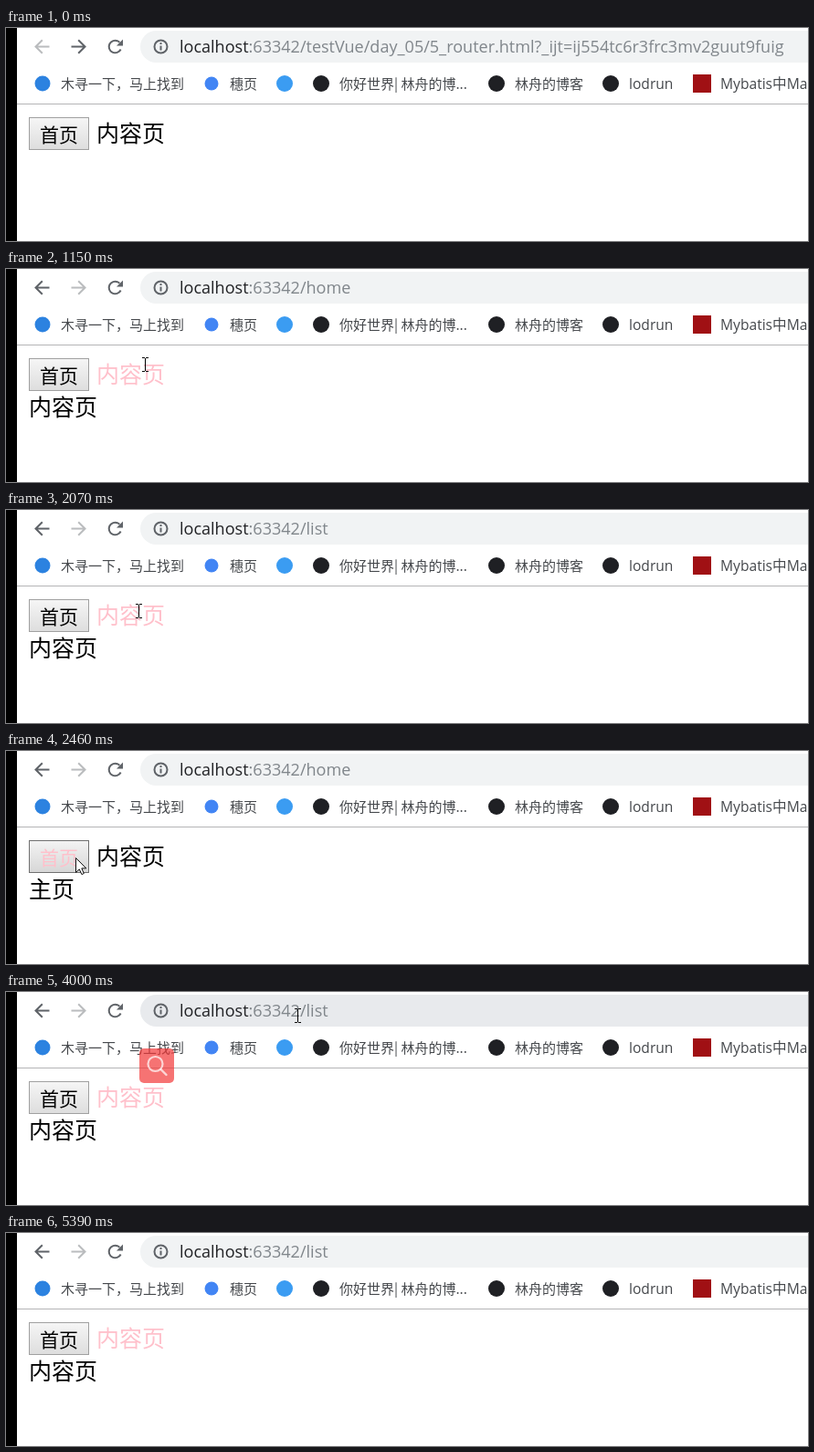
An HTML page with a canvas for the animation above (5490 ms loop, 878 by 234 pixels).

```html
<!DOCTYPE html>
<html lang="zh">
<head>
<meta charset="utf-8">
<title>Router demo</title>
<style>
html, body { margin: 0; width: 100%; height: 100%; overflow: hidden; background: #fff; }
canvas { display: block; }
</style>
</head>
<body>
<canvas id="stage" width="878" height="234"></canvas>
<script>
const ctx = document.getElementById('stage').getContext('2d');
const LOOP = 5490, STEP = 76.7;
const CJK = '"Noto Sans CJK SC", "Noto Sans CJK", "Noto Sans CJK JP", sans-serif';
const LATIN = '"Open Sans", "Noto Sans CJK SC", "Noto Sans CJK", sans-serif';
const PINK = '#ffc0cb', INK = '#5f6368', FADED = '#babcbe';

const urls = {
  start: '/testVue/day_05/5_router.html?_ijt=ij554tc6r3frc3mv2guut9fuig',
  home: '/home',
  list: '/list'
};
const pages = { start: '', home: '主页', list: '内容页' };

// Step at which each page opens; the address follows one step later
const visits = [[0, 'start'], [10, 'home'], [15, 'list'], [20, 'home'], [26, 'list'], [30, 'home'], [36, 'list']];

// Pointer: step, x, y
const path = [
  [1, 697, 214], [3, 480, 130], [5, 250, 62], [6, 150, 46], [8, 58, 106], [9, 60, 115],
  [12, 63, 116], [15, 152, 105], [17, 150, 108], [19, 75, 116], [21, 65, 117], [23, 68, 117],
  [25, 140, 110], [28, 148, 112], [30, 80, 117], [32, 76, 117], [33, 78, 117], [35, 140, 112],
  [38, 150, 106], [39, 160, 82], [40, 240, 40], [41, 325.5, 9], [44, 362, 16], [48, 364, 18],
  [52, 318.5, 26], [55, 332.5, 27.5], [56, 336.5, 27.5], [60, 336.5, 27.5], [61, 500, 90], [62, 766, 210]
];

const routeAt = step => visits.filter(v => v[0] <= step).pop()[1];

function pointerAt(step) {
  const i = path.findIndex(p => p[0] >= step);
  if (step < 1 || i < 0) return null;
  const b = path[i], a = path[i - 1] || b;
  const f = b === a ? 0 : (step - a[0]) / (b[0] - a[0]);
  return { x: a[1] + (b[1] - a[1]) * f, y: a[2] + (b[2] - a[2]) * f };
}

const inside = (p, x, y, w, h) => !!p && p.x >= x && p.x < x + w && p.y >= y && p.y < y + h;

function text(str, x, y, size, color, family = CJK) {
  ctx.font = size + 'px ' + family;
  ctx.fillStyle = color;
  ctx.fillText(str, x, y);
  return x + ctx.measureText(str).width;
}

function rect(x, y, w, h, color) {
  ctx.fillStyle = color;
  ctx.fillRect(x, y, w, h);
}

function round(x, y, w, h, r, color) {
  ctx.beginPath();
  ctx.roundRect(x, y, w, h, r);
  ctx.fillStyle = color;
  ctx.fill();
}

const dot = (x, y, r, color) => round(x - r, y - r, 2 * r, 2 * r, r, color);

function stroke(d, color, width) {
  ctx.strokeStyle = color;
  ctx.lineWidth = width;
  ctx.stroke(new Path2D(d));
}

function navArrow(cx, dir, color) {
  ctx.save();
  ctx.translate(cx, 20.5);
  ctx.scale(dir, 1);
  stroke('M8 0H-7M.3 -7.3L-7 0L.3 7.3', color, 2);
  ctx.restore();
}

function toolbar(route, hover) {
  const fresh = route === 'start';
  navArrow(39.5, 1, fresh ? FADED : INK);
  navArrow(79.5, -1, fresh ? INK : FADED);

  ctx.beginPath();
  ctx.arc(119.5, 20.5, 6.8, 0.45, 5.5);
  ctx.strokeStyle = INK;
  ctx.lineWidth = 2;
  ctx.stroke();
  ctx.fillStyle = INK;
  ctx.fill(new Path2D('M128 12.5V19.5H121Z'));

  round(147, 3, 760, 35, 17.5, hover ? '#e8eaed' : '#f1f3f4');
  ctx.beginPath();
  ctx.arc(169.5, 20.5, 7, 0, 7);
  ctx.strokeStyle = INK;
  ctx.stroke();
  rect(168.5, 19.5, 2, 5, INK);
  rect(168.5, 16, 2, 2, INK);

  const end = text('localhost', 190, 27, 18.05, '#202124', LATIN);
  text(':63342' + urls[route], end, 27, 18.05, '#80868b', LATIN);
}

function bookmarks() {
  const gray = '#45484c';
  dot(40, 61, 8.5, '#2c82e0');
  dot(225, 61, 7.5, '#4285f4');
  dot(305, 61, 9, '#3b9cf2');
  for (const x of [345, 537, 662]) dot(x, 61, 9, '#1f2024');
  rect(752, 51, 20, 20, '#a01014');
  text('木寻一下，马上找到', 60, 67, 15, gray);
  text('穗页', 245, 67, 15, gray);
  text('你好世界| 林舟的博...', 365, 67, 15, gray);
  text('林舟的博客', 557, 67, 15, gray);
  text('lodrun', 682, 67, 15.6, gray, LATIN);
  text('Mybatis中Ma', 782, 67, 15.6, gray, LATIN);
  rect(12, 83, 866, 1, '#b4b4b6');
}

function page(route, hover) {
  const shade = ctx.createLinearGradient(0, 98, 0, 134);
  shade.addColorStop(0, hover ? '#f4f4f4' : '#f6f6f6');
  shade.addColorStop(1, hover ? '#d6d6d6' : '#dddddd');
  rect(25, 98, 66, 36, hover ? '#707070' : '#a0a0a0');
  rect(26, 99, 64, 34, shade);
  text('首页', 37, 125, 21, route === 'home' ? PINK : '#000');
  text('内容页', 99, 125, 25, route === 'list' ? PINK : '#000');
  text(pages[route], 25, 161, 25, '#000');
}

function searchBadge(alpha) {
  ctx.save();
  ctx.globalAlpha = alpha;
  round(146, 62, 38, 38, 5, '#f33838');
  ctx.lineCap = 'round';
  ctx.beginPath();
  ctx.arc(163.5, 79, 8, 0, 7);
  ctx.strokeStyle = '#fff';
  ctx.lineWidth = 2.2;
  ctx.stroke();
  stroke('M169.5 85L175.5 91', '#fff', 2.4);
  ctx.restore();
}

function pointer(p, beam) {
  ctx.save();
  ctx.translate(Math.round(p.x), Math.round(p.y));
  if (beam) {
    stroke('M-3 -7.5H0M1 -7.5H4M.5 -7V7M-3 7.5H0M1 7.5H4', '#000', 1);
  } else {
    const arrow = 'M.5 .5V16.5L4.3 12.9L6.9 18.6L9.3 17.5L6.8 11.9H11.8Z';
    ctx.fillStyle = '#fff';
    ctx.fill(new Path2D(arrow));
    stroke(arrow, '#111', 1);
  }
  ctx.restore();
}

function draw(now) {
  const t = now % LOOP;
  const step = Math.floor((t + 8) / STEP);
  const p = pointerAt(step);
  const route = routeAt(step);
  const overBar = inside(p, 147, 0, 731, 38);
  const overText = inside(p, 99, 98, 75, 36) || inside(p, 25, 136, 75, 32);

  rect(0, 0, 878, 234, '#fff');
  rect(0, 0, 12, 234, '#000');
  toolbar(routeAt(step - 1 < 0 ? 0 : step - 1), overBar);
  bookmarks();
  page(route, inside(p, 25, 98, 66, 36));
  if (step >= 40 && t < 5390) {
    searchBadge(0.85 - 0.15 * Math.min(1, Math.max(0, (step - 43) / 8)));
  }
  if (p) pointer(p, overBar || overText);
}

const begin = performance.now();
function tick() {
  draw(performance.now() - begin);
  requestAnimationFrame(tick);
}
tick();
</script>
</body>
</html>
```
